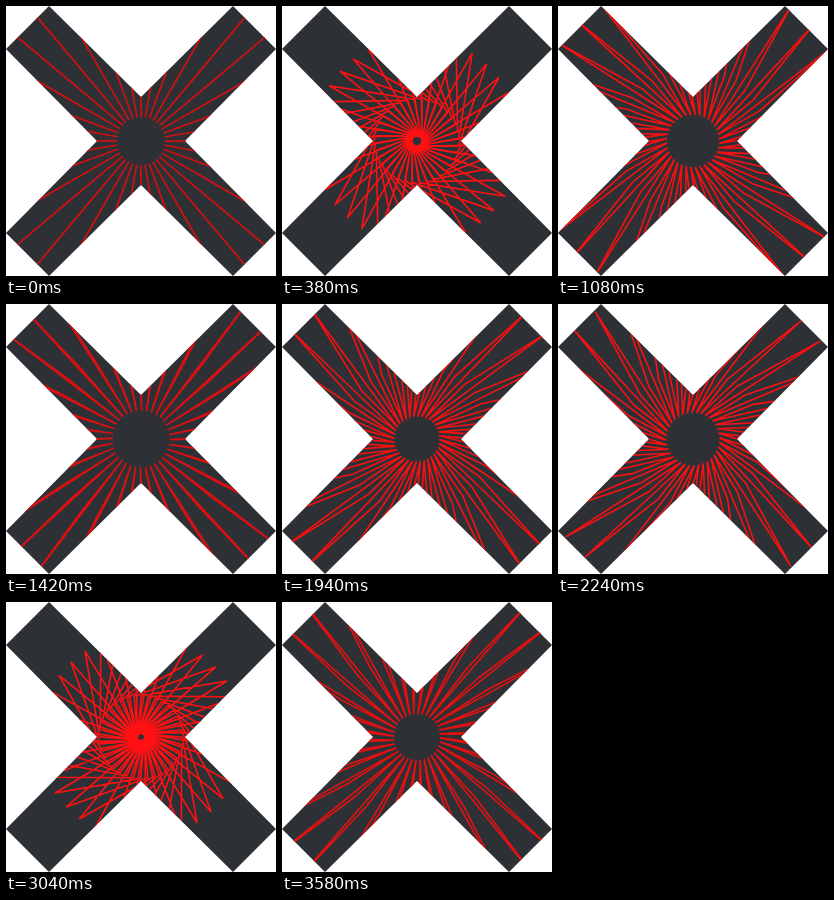
These frames come from a looping animation (270x270 px, 3600 ms). An HTML page with a canvas:

```html
<!DOCTYPE html>
<html lang="en">
<head>
<meta charset="utf-8">
<title>Spoke cross</title>
<style>
  html, body { margin: 0; width: 100%; height: 100%; overflow: hidden; background: #fff; }
  canvas { display: block; width: 270px; height: 270px; }
</style>
</head>
<body>
<canvas id="stage" width="270" height="270"></canvas>
<script>
const ctx = document.getElementById('stage').getContext('2d');
const SIZE = 270, MID = SIZE / 2, LOOP = 3600, SPOKES = 36;
const STEP = 360 / SPOKES, DEG = Math.PI / 180;
const { sin, cos, abs, exp, max, round } = Math;

// Two crossed diagonal bars
const ARM = 43, NOTCH = 91;
const cross = new Path2D();
for (let q = 0; q < 4; q++) {
  const c = cos(q * 90 * DEG), s = sin(q * 90 * DEG);
  for (const [x, y] of [[ARM - MID, -MID], [0, NOTCH - MID], [MID - ARM, -MID]]) {
    cross.lineTo(MID + x * c - y * s, MID + x * s + y * c);
  }
}
cross.closePath();

function polar(r, deg) {
  return [MID + r * cos(deg * DEG), MID + r * sin(deg * DEG)];
}

// Every spoke is a triangle of hub, knee and tip that folds flat as the swing passes zero
function pose(t) {
  const a = 2 * Math.PI * t / LOOP;
  const swing = 36 * sin(a) + 25 * sin(2 * a) + 10 * sin(3 * a) - 3 * (1 - cos(a));
  const fold = abs(swing);
  return {
    swing,
    spin: 2 * STEP * t / LOOP,
    hub: max(4, 24 - 0.25 * fold - 8 * sin(a) * sin(2 * a)),
    knee: 38 + 57 * exp(-fold / 20),
    tip: 65 + 125 * exp(-fold / 47),
    dim: 50 * exp(-fold / 6)
  };
}

function draw(t) {
  const { swing, spin, hub, knee, tip, dim } = pose(t);
  ctx.fillStyle = '#fff';
  ctx.fillRect(0, 0, SIZE, SIZE);
  ctx.save();
  ctx.clip(cross);
  ctx.fillStyle = '#2d3135';
  ctx.fillRect(0, 0, SIZE, SIZE);

  ctx.beginPath();
  for (let i = 0; i < SPOKES; i++) {
    const a = spin + i * STEP;
    ctx.moveTo(...polar(hub, a + 2 * swing));
    ctx.lineTo(...polar(knee, a + swing));
    ctx.lineTo(...polar(tip, a));
    ctx.closePath();
  }
  ctx.strokeStyle = `rgb(${round(255 - dim)}, 16, 18)`;
  ctx.lineWidth = 1.6;
  ctx.lineJoin = 'bevel';
  ctx.stroke();
  ctx.restore();
}

const start = performance.now();
function tick() {
  draw((performance.now() - start) % LOOP);
  requestAnimationFrame(tick);
}
tick();
</script>
</body>
</html>
```
